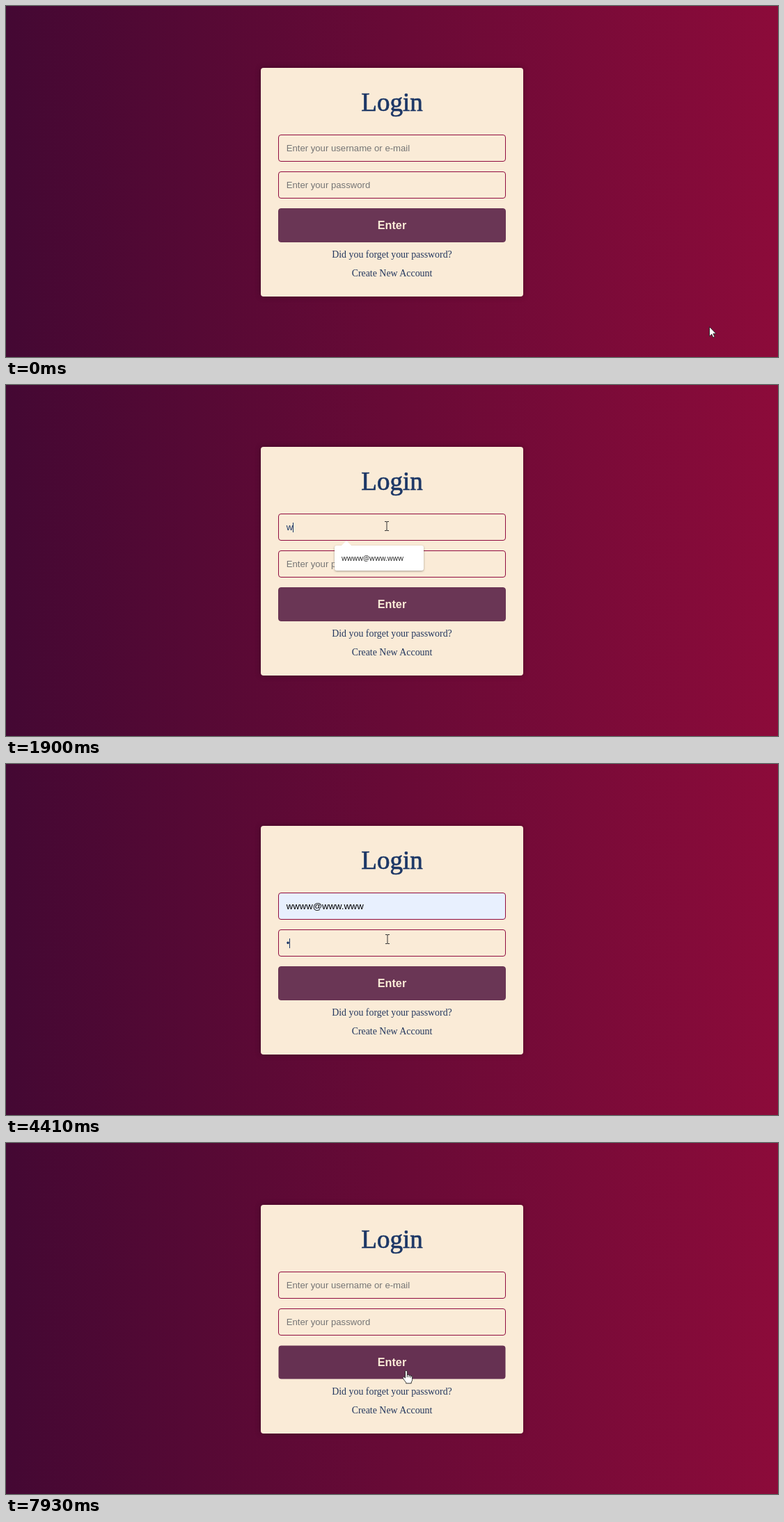
These frames come from a looping animation (1109x505 px, 8000 ms). An HTML page:

```html
<!DOCTYPE html>
<html lang="en">
<head>
<meta charset="utf-8">
<title>Login</title>
<style>
  html, body { margin: 0; width: 100%; height: 100%; overflow: hidden; }
  body {
    position: relative;
    background: linear-gradient(to right, #440833, #680a36 50%, #8c0b3a);
    font-family: "Liberation Sans", Arial, sans-serif;
  }
  body * { box-sizing: border-box; }
  .abs, .field, .link, .item { position: absolute; white-space: pre; }
  #card {
    left: 366px; top: 89px; width: 377px; height: 329px;
    border-radius: 4px; background: #faebd7;
    box-shadow: 0 0 8px rgba(0, 0, 0, .3);
  }
  #title, .link {
    left: 366px; width: 377px; text-align: center; color: #1c3766;
    font-family: "Liberation Serif", Times, serif;
  }
  #title { top: 114px; font-size: 37px; line-height: 49px; -webkit-text-stroke: .7px #1c3766; }
  .link { font-size: 13.9px; line-height: 20px; color: #24385f; }
  .field {
    left: 391px; width: 327px; height: 39px; padding-left: 10.7px;
    border: 1px solid #900c3f; border-radius: 4px;
    font-size: 13.15px; line-height: 37px; color: #1c3766;
  }
  .field.filled { background: #e8f0fe; color: #000; }
  .field.preview .value { font: 10px/38px "Open Sans", sans-serif; }
  .hint { color: #757575; }
  .caret {
    display: inline-block; width: 1px; height: 14px; margin-right: -1px;
    background: #1c3766; vertical-align: -2.5px;
  }
  #button {
    left: 391px; top: 291px; width: 327px; height: 49px; border-radius: 4px;
    color: #faebd7; font-size: 16.2px; font-weight: bold; line-height: 48px; text-align: center;
  }
  #list {
    left: 472px; top: 231px; border-radius: 3px; background: #fff;
    box-shadow: 0 1px 3px rgba(0, 0, 0, .35);
    font: 10px/29.5px "Open Sans", sans-serif; color: #222;
  }
  #list::before {
    content: ""; position: absolute; left: 10px; top: -7px;
    border: 7px solid transparent; border-top: 0; border-bottom-color: #fff;
  }
  .item { left: 0; width: 100%; height: 29.5px; padding-left: 10px; }
  .item.hot { background: #e6e6e6; }
  #click { width: 20px; height: 20px; border-radius: 50%; background: rgba(247, 234, 42, .8); }
  #pointer { left: 0; top: 0; width: 1px; height: 1px; overflow: visible; }
</style>
</head>
<body>
<div id="card" class="abs"></div>
<div id="title" class="abs">Login</div>
<div id="user" class="field" style="top:185px"><span class="value"></span><i class="caret"></i><span class="hint">Enter your username or e-mail</span></div>
<div id="pass" class="field" style="top:238px"><span class="value"></span><i class="caret"></i><span class="hint">Enter your password</span></div>
<div id="button" class="abs">Enter</div>
<div class="link" style="top:348px">Did you forget your password?</div>
<div class="link" style="top:375px">Create New Account</div>
<div id="list" class="abs"></div>
<div id="click" class="abs"></div>
<svg id="pointer" class="abs">
  <path id="arrow" d="M.5 .5V14.2L3.7 11.2L5.8 16L8 15L5.9 10.4H10Z" fill="#fff" stroke="#222" stroke-width=".9"/>
  <path id="beam" d="M-3 -6.5H-.8Q0 -6.5 0 -5.6V5.6Q0 6.5 -.8 6.5H-3M3 -6.5H.8Q0 -6.5 0 -5.6M3 6.5H.8Q0 6.5 0 5.6" fill="none" stroke="#333"/>
  <g id="hand" stroke="#222" stroke-width=".9" stroke-linejoin="round">
    <path d="M-1.5 11V1.8Q-1.5 .4 -.1 .4Q1.3 .4 1.3 1.8V6.6Q3.6 5.8 4 7.3Q6 6.6 6.4 8.1Q8.6 7.6 8.6 9.6V13.4Q8.6 15.6 7.2 17V18.8H-.4V17.4Q-2.6 15 -4.6 11.6Q-5.4 10.2 -4.2 9.7Q-3 9.3 -1.5 11Z" fill="#fff"/>
    <path d="M1.3 6.6V10M4 7.3V10.2M6.4 8.1V10.6" fill="none"/>
  </g>
</svg>
<script>
const LOOP = 8000, TICK = LOOP / 120;
const EMAIL = "wwww@www.www";
const NAMES = [EMAIL, "tavela", "tavelas", "tavelamorin@mail.example", "tavela47", "backyard_tea_baker"];

// time, x, y of the pointer
const PATH = [
  [0, 1010, 461], [870, 547, 202], [940, 547, 203], [2100, 547, 203],
  [2660, 559, 251], [3010, 559, 251], [3410, 548, 252], [4680, 548, 252],
  [4740, 548, 253], [6030, 548, 253], [6770, 552, 313], [7290, 552, 313],
  [7600, 568, 373], [7700, 570, 370], [7930, 575, 327]
];
const CLICKS = [[1080, 1240], [2860, 3010], [3610, 3740], [6770, 6840]];
const KEYS = [4410, 4680, 4940, 5270, 5600, 5800];

const $ = id => document.getElementById(id);
const between = (v, a, b) => v >= a && v < b;
const inside = ([x, y], l, t, r, b) => between(x, l, r) && between(y, t, b);
const show = (el, on) => { el.style.display = on ? "" : "none"; };

const items = NAMES.map((name, i) => {
  const el = document.createElement("div");
  el.className = "item";
  el.textContent = name;
  el.style.top = 3.5 + i * 29.5 + "px";
  $("list").append(el);
  return el;
});

function pointerAt(t) {
  const q = Math.floor((t + 10) / TICK) * TICK;
  const i = PATH.findIndex(p => p[0] > q);
  if (i < 0) return PATH[PATH.length - 1].slice(1);
  if (i === 0) return PATH[0].slice(1);
  const [a, b] = [PATH[i - 1], PATH[i]];
  const u = (q - a[0]) / (b[0] - a[0]);
  const e = u * u * (3 - 2 * u);
  return [1, 2].map(k => a[k] + (b[k] - a[k]) * e);
}

const overButton = t => !between(t, 6840, 7300) && inside(pointerAt(t), 391, 291, 718, 340);

// A linear transition equals the mean hover state over its duration.
function hoverAt(t) {
  if (between(t, 6840, 7300)) return 0;
  let sum = 0;
  for (let k = 0; k < 8; k++) sum += overButton(t - k * 20);
  return sum / 8;
}

function setField(id, text, caret, state) {
  const el = $(id);
  el.className = "field " + state;
  el.querySelector(".value").textContent = text;
  show(el.querySelector(".caret"), caret);
  show(el.querySelector(".hint"), !text);
}

function drawPointer(p, listOpen) {
  let kind = "arrow";
  const onList = listOpen && inside(p, 472, 231, 600, 267);
  if (!onList && (inside(p, 391, 185, 718, 224) || inside(p, 391, 238, 718, 277))) kind = "beam";
  if (inside(p, 391, 291, 718, 340) || inside(p, 469, 349, 640, 368) || inside(p, 495, 376, 614, 395)) kind = "hand";
  for (const id of ["arrow", "beam", "hand"]) show($(id), id === kind);
  $("pointer").style.transform = `translate(${Math.round(p[0])}px, ${Math.round(p[1])}px)`;
}

function draw(t) {
  const p = pointerAt(t);
  const listOpen = between(t, 1080, 3010);
  const short = t >= 1780;
  const preview = listOpen && short && p[1] > 235;
  const filled = between(t, 3010, 6840);

  const typed = between(t, 1720, 3010) ? EMAIL[0] : "";
  const userCaret = between(t, 1080, 3610) && !between(t, 1650, 1720) && !preview;
  setField("user", filled || preview ? EMAIL : typed, userCaret,
    preview ? "filled preview" : filled ? "filled" : "");

  const dots = t < 6840 ? KEYS.filter(k => t >= k).length : 0;
  const passCaret = between(t, 3610, 6840) && !between(t, 4140, 4410) && !between(t, 6330, 6770);
  setField("pass", "•".repeat(dots), passCaret, "");

  show($("list"), listOpen);
  $("list").style.width = (short ? 128 : 157.5) + "px";
  $("list").style.height = (short ? 36 : 183.5) + "px";
  items.forEach((el, i) => show(el, !short || i === 0));
  items[0].classList.toggle("hot", preview);

  const h = hoverAt(t);
  $("button").style.background = `rgb(${106 - 8 * h}, ${54 - 10 * h}, ${85 - 6 * h})`;
  $("button").style.clipPath = `inset(${h}px round 4px)`;

  show($("click"), CLICKS.some(([a, b]) => between(t, a, b)));
  $("click").style.left = p[0] - 12 + "px";
  $("click").style.top = p[1] - 11 + "px";
  drawPointer(p, listOpen);
}

const start = performance.now();
function frame() {
  draw((performance.now() - start) % LOOP);
  requestAnimationFrame(frame);
}
frame();
</script>
</body>
</html>
```
